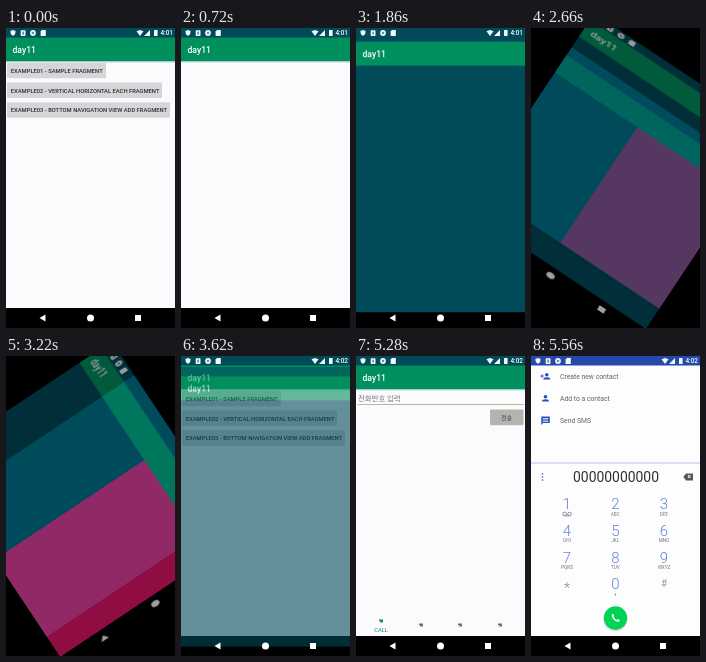
An HTML page with a canvas that plays this animation: 169 px wide and 300 px high, repeating every 5.68 s.

```html
<!DOCTYPE html>
<html lang="en">
<head>
<meta charset="utf-8">
<title>day11</title>
<style>
  html, body { margin: 0; width: 100%; height: 100%; overflow: hidden; background: #000; }
  canvas { display: block; width: 100vw; height: 100vh; }
</style>
</head>
<body>
<canvas id="stage"></canvas>
<script>
const W = 169, H = 300, LOOP = 5680, STEP = 20;
const PRIMARY = '#00905e', DARK = '#004a5a', ACCENT = '#e6146a', PAGE = '#fbfbfe', KEY = '#6480da', BLUE = '#2650bc';
const FONT = 'Roboto, "Noto Sans CJK KR", "Noto Sans CJK", sans-serif';
const canvas = document.getElementById('stage');
const stage = canvas.getContext('2d');

const clamp = x => Math.max(0, Math.min(1, x));
const span = (t, from, to) => clamp((t - from) / (to - from));
const easeOut = x => 1 - (1 - x) * (1 - x);

function rect(c, x, y, w, h, color) {
  c.fillStyle = color;
  c.fillRect(x, y, w, h);
}

function round(c, x, y, w, h, r, color) {
  c.fillStyle = color;
  c.beginPath();
  c.roundRect(x, y, w, h, r);
  c.fill();
}

function disc(c, x, y, r, color) {
  c.fillStyle = color;
  c.beginPath();
  c.arc(x, y, r, 0, 7);
  c.fill();
}

function poly(c, points, color) {
  c.fillStyle = color;
  c.beginPath();
  points.forEach(([x, y]) => c.lineTo(x, y));
  c.fill();
}

function text(c, str, x, y, size, color, align = 'left', weight = 400) {
  c.font = `${weight} ${size}px ${FONT}`;
  c.fillStyle = color;
  c.textAlign = align;
  c.textBaseline = 'alphabetic';
  c.fillText(str, x, y + size * 0.355);
}

function ripple(c, x, y, w, h, cx, cy, p) {
  if (p <= 0 || p >= 1) return;
  c.save();
  c.beginPath();
  c.rect(x, y, w, h);
  c.clip();
  disc(c, cx, cy, 4 + easeOut(p) * w * 0.6, `rgba(0,0,0,${0.16 * Math.min(1, 3 * (1 - p))})`);
  c.restore();
}

// Window frame: status bar, title bar, page and navigation bar
function frame(c, w, h, page = PAGE) {
  const wide = w > h, bar = wide ? 30 : 33.5;
  const right = wide ? w - 20 : w;
  rect(c, 0, 0, w, h, page);
  rect(c, 0, 0, w, 10, DARK);
  rect(c, 0, 9.5, right, bar - 9.5, PRIMARY);
  text(c, 'day11', 6.5, wide ? 20 : 21.5, 8.6, '#fff', 'left', 500);
  if (wide) rect(c, right, 0, 20, h, '#000');
  else rect(c, 0, 280, w, 20, '#000');
}

function systemIcons(c, w, h, clock) {
  const wide = w > h, end = wide ? w - 20 : w, ink = '#f4f8fa';
  poly(c, [[7, 2], [9.6, 3], [9.2, 6], [7, 8], [4.8, 6], [4.4, 3]], ink);
  round(c, 14.7, 2.3, 4.8, 5.6, 0.6, ink);
  rect(c, 16.6, 3.6, 1, 3, DARK);
  disc(c, 27, 5, 2.9, ink);
  disc(c, 27, 5, 1.3, '#6c959a');
  poly(c, [[36, 2], [39.8, 2], [39.8, 8], [34.6, 8], [34.6, 3.5]], ink);
  poly(c, [[end - 38.5, 3.2], [end - 35, 2], [end - 31.5, 3.2], [end - 35, 8]], ink);
  poly(c, [[end - 25, 2], [end - 25, 8], [end - 31, 8]], ink);
  round(c, end - 21, 2, 3.6, 6, 0.5, ink);
  text(c, clock, end - 2, 5.2, 6.4, '#fff', 'right', 500);

  const spot = along => wide ? [w - 10, h - along] : [along, 290];
  const [bx, by] = spot(36.7), [hx, hy] = spot(84.5), [sx, sy] = spot(132);
  poly(c, [[bx - 3.2, by], [bx + 2.8, by - 3.4], [bx + 2.8, by + 3.4]], '#fff');
  disc(c, hx, hy, 3.5, '#fff');
  rect(c, sx - 3, sy - 3, 6, 6, '#fff');
}

function shadow(c) {
  rect(c, 0, 33.5, W, 1, '#c3d5e4');
}

function home(c, t) {
  frame(c, W, H);
  shadow(c);
  const buttons = [
    ['EXAMPLE01 - SAMPLE FRAGMENT', 99],
    ['EXAMPLE02 - VERTICAL HORIZONTAL EACH FRAGMENT', 155],
    ['EXAMPLE03 - BOTTOM NAVIGATION VIEW ADD FRAGMENT', 163]
  ];
  buttons.forEach(([label, w], i) => {
    const y = 34.8 + i * 19.7;
    round(c, 1, y, w, 15.5, 1, '#d5d6d8');
    if (i === 0) ripple(c, 1, y, w, 15.5, 50, y + 8, span(t, 20, 320));
    text(c, label, 4.8, y + 8, 5.8, '#2b2c30', 'left', 500);
  });
}

function sample(c) {
  frame(c, W, H);
  shadow(c);
}

function splitTall(c) {
  frame(c, W, H, DARK);
}

function splitWide(c) {
  frame(c, H, W, DARK);
  rect(c, 140, 30, 140, W - 30, ACCENT);
}

function tabIcon(c, x, y, color) {
  round(c, x - 2.1, y - 1.6, 4.2, 1.5, 0.7, color);
  round(c, x - 0.9, y - 0.3, 2.9, 1.7, 0.5, color);
}

function callPage(c, t) {
  frame(c, W, H);
  shadow(c);
  const focused = t < 4340;
  text(c, '전화번호 입력', 2, 42.5, 7.4, '#76787b');
  if (focused) rect(c, 1.5, 38, 0.8, 9, ACCENT);
  rect(c, 1.5, 48, 166, focused ? 1 : 0.8, focused ? ACCENT : '#aaa878');
  const shade = 214 - 34 * span(t, 5160, 5260);
  round(c, 134, 53.5, 33.5, 15.7, 1, `rgb(${shade},${shade},${shade - 6})`);
  text(c, '전송', 150.7, 61.5, 5.8, '#30324c', 'center', 500);
  ripple(c, 1, 256, 48, 24, 25, 268, span(t, 4340, 4900));
  tabIcon(c, 25, 265, PRIMARY);
  text(c, 'CALL', 25, 273.8, 5.7, '#00857a', 'center');
  [65, 104, 144].forEach(x => tabIcon(c, x, 269, '#6b6d70'));
}

function person(c, x, y) {
  disc(c, x, y - 1.8, 1.8, BLUE);
  c.beginPath();
  c.ellipse(x, y + 3, 3.5, 2.3, 0, Math.PI, 0);
  c.fill();
}

function handset(c, x, y) {
  c.strokeStyle = '#fff';
  c.lineWidth = 1.5;
  c.beginPath();
  c.moveTo(x - 3, y - 3.2);
  c.quadraticCurveTo(x - 2.2, y + 2.4, x + 3.2, y + 3);
  c.stroke();
  rect(c, x - 3.7, y - 3.8, 2.1, 2.5, '#fff');
  rect(c, x + 1.5, y + 1.4, 2.4, 2.2, '#fff');
}

function dialer(c) {
  rect(c, 0, 0, W, H, '#fdfdfe');
  rect(c, 0, 0, W, 9.5, '#2449aa');
  rect(c, 0, 280, W, 20, '#000');
  ['Create new contact', 'Add to a contact', 'Send SMS'].forEach((label, i) =>
    text(c, label, 29, 20.5 + i * 22, 6.8, '#606266'));
  person(c, 15.8, 20.5);
  rect(c, 9.4, 19.6, 3.4, 0.9, BLUE);
  rect(c, 10.65, 18.3, 0.9, 3.5, BLUE);
  person(c, 14.5, 42.5);
  poly(c, [[10.3, 60.5], [18.8, 60.5], [18.8, 67], [12, 67], [10.3, 69]], BLUE);
  for (const y of [62, 63.6, 65.2]) rect(c, 11.8, y, 5.4, 0.7, '#fff');

  rect(c, 0, 106.4, W, 1.2, '#c9c9f2');
  for (const y of [118, 121, 124]) disc(c, 11.5, y, 0.8, BLUE);
  text(c, '00000000000', 85, 121.5, 13.9, '#303236', 'center');
  poly(c, [[152.3, 121], [155, 117.5], [162, 117.5], [162, 124.5], [155, 124.5]], '#55575b');
  text(c, '×', 158.3, 121, 6.5, '#fff', 'center', 700);

  const letters = ['', 'ABC', 'DEF', 'GHI', 'JKL', 'MNO', 'PQRS', 'TUV', 'WXYZ', '', '+', ''];
  [...'123456789*0#'].forEach((key, i) => {
    const x = [36, 84.3, 133][i % 3], y = 147.8 + Math.floor(i / 3) * 26.7;
    if (key === '*') text(c, key, x, y + 4, 15, '#8a8c90', 'center', 300);
    else if (key === '#') text(c, key, x, y, 10, '#9a9ca0', 'center');
    else text(c, key, x, y, 15, KEY, 'center', 300);
    text(c, letters[i], x, y + 10.2, 4.7, '#74767a', 'center');
  });
  c.strokeStyle = '#74767a';
  c.lineWidth = 0.8;
  c.beginPath();
  c.arc(33.5, 158, 1.8, 0, 7);
  c.moveTo(40.3, 158);
  c.arc(38.5, 158, 1.8, 0, 7);
  c.moveTo(33.5, 159.8);
  c.lineTo(38.5, 159.8);
  c.stroke();
  disc(c, 84.5, 263.3, 12, '#d9dde0');
  disc(c, 84.5, 262, 11.7, '#00d455');
  handset(c, 84.5, 262);
}

function layer(w, h, draw) {
  const k = canvas.width / W;
  const sheet = document.createElement('canvas');
  sheet.width = Math.round(w * k);
  sheet.height = Math.round(h * k);
  const c = sheet.getContext('2d');
  c.scale(sheet.width / w, sheet.height / h);
  draw(c);
  return sheet;
}

// Upper window slides and fades over the lower one; p = 1 is fully open
function slide(c, lower, upper, p, t) {
  if (p < 1) lower(c, t);
  if (p <= 0) return;
  c.save();
  c.globalAlpha = Math.min(1, p * 1.8);
  c.drawImage(layer(W, H, s => upper(s, t)), 0, 24 * (1 - easeOut(p)), W, H);
  c.restore();
}

// Both orientations turn together, the outgoing one stretched towards the new shape
function turn(c, toWide, p, clock) {
  const tall = layer(W, H, s => { splitTall(s); systemIcons(s, W, H, clock); });
  const wide = layer(H, W, s => { splitWide(s); systemIcons(s, H, W, clock); });
  const [from, to] = toWide ? [tall, wide] : [wide, tall];
  const [fw, fh] = toWide ? [W, H] : [H, W];
  const w = fw + (fh - fw) * p, h = fh + (fw - fh) * p;
  rect(c, 0, 0, W, H, '#000');
  c.save();
  c.translate(W / 2, H / 2);
  c.rotate((toWide ? p : 1 - p) * Math.PI / 2);
  c.beginPath();
  c.rect(-w / 2, -h / 2, w, h);
  c.clip();
  c.globalCompositeOperation = 'lighter';
  c.globalAlpha = 1 - p;
  c.drawImage(from, -w / 2, -h / 2, w, h);
  c.globalAlpha = p;
  c.drawImage(to, -fh / 2, -fw / 2, fh, fw);
  c.restore();
}

const turnProgress = (t, start) => 0.374 + 0.626 * span(t, start, start + 140);

function scene(c, t) {
  const clock = t < 2940 ? '4:01' : '4:02';
  if (t >= 2660 && t < 3220) return turn(c, true, turnProgress(t, 2660), clock);
  if (t >= 3220 && t < 3360) return turn(c, false, turnProgress(t, 3220), clock);

  if (t < 1280) slide(c, home, sample, span(t, 260, 580), t);
  else if (t < 1720) slide(c, home, sample, 1 - span(t, 1280, 1380), t);
  else if (t < 2660) slide(c, home, splitTall, span(t, 1720, 1960), t);
  else if (t < 3900) slide(c, home, splitTall, 1 - span(t, 3500, 3680), t);
  else if (t < 5280) slide(c, home, callPage, span(t, 3920, 4160), t);
  else slide(c, callPage, dialer, span(t, 5280, 5560), t);
  systemIcons(c, W, H, clock);
}

let last = '';
const start = performance.now();

function tick() {
  const k = window.devicePixelRatio || 1;
  const w = Math.round(innerWidth * k), h = Math.round(innerHeight * k);
  const t = Math.floor(((performance.now() - start) % LOOP) / STEP) * STEP;
  const state = `${t} ${w} ${h}`;
  if (state !== last && w && h) {
    last = state;
    if (canvas.width !== w || canvas.height !== h) {
      canvas.width = w;
      canvas.height = h;
    }
    stage.setTransform(w / W, 0, 0, h / H, 0, 0);
    scene(stage, t);
  }
  requestAnimationFrame(tick);
}
tick();
</script>
</body>
</html>
```
